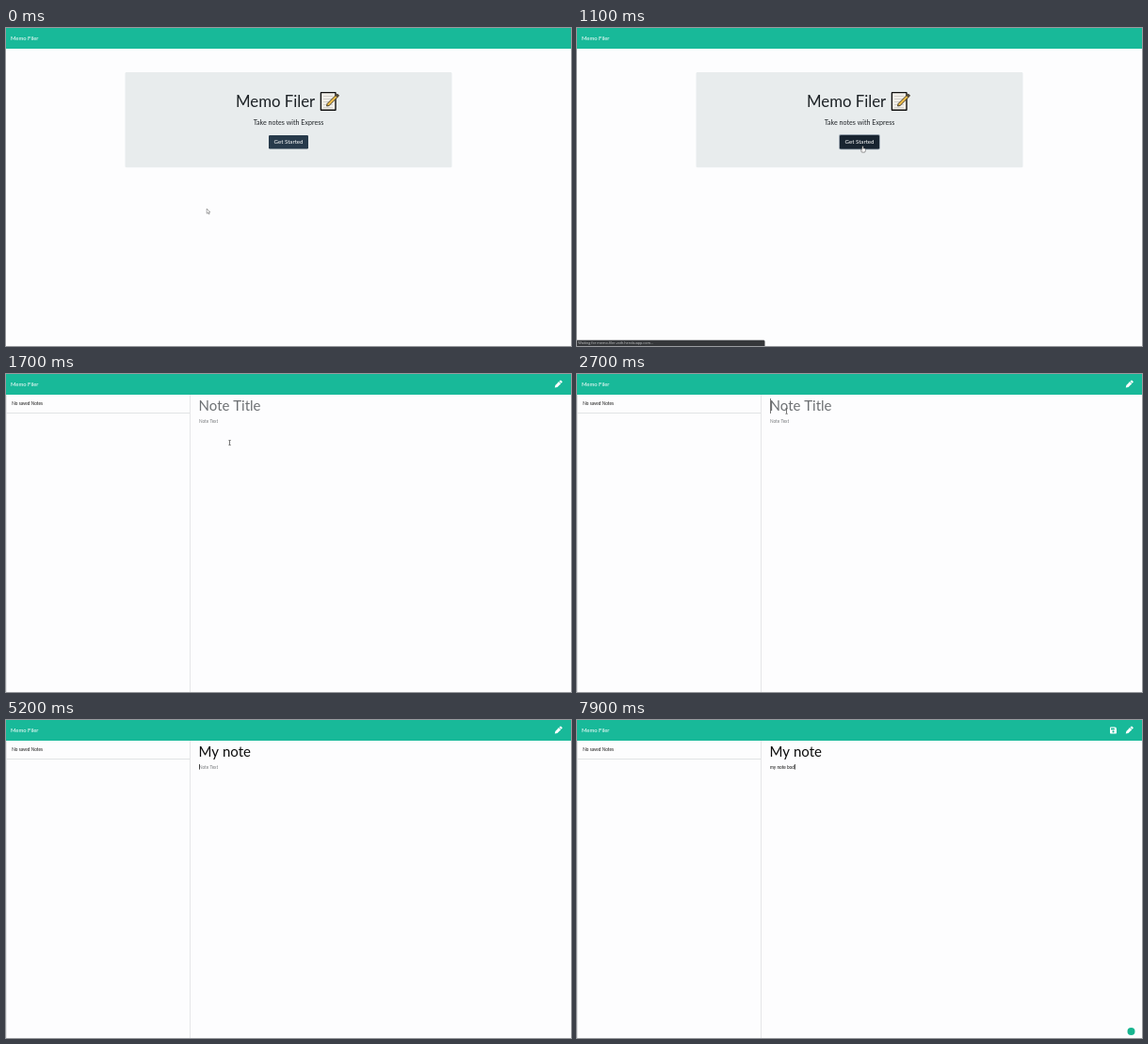
An HTML page with a canvas for the animation above (8000 ms loop, 600 by 338 pixels).

```html
<!DOCTYPE html>
<html lang="en">
<head>
<meta charset="utf-8">
<title>Memo Filer</title>
<style>
  html, body { margin: 0; width: 100%; height: 100%; overflow: hidden; background: #fdfdfe; }
  canvas { display: block; width: 600px; height: 338px; }
</style>
</head>
<body>
<canvas id="stage"></canvas>
<script>
const W = 600, H = 338, LOOP = 8000, STEP = 100;
const APP = "Memo Filer", HOST = "memo-filer-zxth.herokuapp.com";
const GREEN = "#18b999", PAGE = "#fdfdfe", INK = "#0c0c0c";
const OPEN_NOTES = 1200, LIST_LOADED = 1500;
const FOCUS_TITLE = 2400, TYPE_TITLE = 3900, FOCUS_BODY = 5200, TYPE_BODY = 5700;

const canvas = document.getElementById("stage");
const ctx = canvas.getContext("2d");
const dpr = window.devicePixelRatio || 1;
canvas.width = W * dpr;
canvas.height = H * dpr;

// Turning points of the pointer; it eases between them
const stops = [
  { t: 0, x: 213.2, y: 192 },
  { t: 500, x: 340, y: 79 },
  { t: 1000, x: 303.5, y: 125 },
  { t: 1200, x: 303, y: 126 },
  { t: 1700, x: 237.5, y: 73 },
  { t: 1900, x: 196, y: 89 },
  { t: 2200, x: 250, y: 42 },
  { t: 2400, x: 222.5, y: 39.5 }
];

function pointerAt(t) {
  const i = stops.findIndex(s => s.t > t);
  const b = stops.at(i), a = i < 0 ? b : stops[i - 1];
  const k = a === b ? 1 : (t - a.t) / (b.t - a.t);
  const ease = k * k * (3 - 2 * k);
  return [a.x + (b.x - a.x) * ease, a.y + (b.y - a.y) * ease];
}

// One character at `start`, then one more every `pace` ms
function typed(text, t, start, pace) {
  return text.slice(0, Math.max(0, Math.floor((t - start) / pace) + 1));
}

function rect(x, y, w, h, color) {
  ctx.fillStyle = color;
  ctx.fillRect(x, y, w, h);
}

function rounded(x, y, w, h, r, fill, stroke) {
  ctx.beginPath();
  ctx.roundRect(x, y, w, h, r);
  paint(fill, stroke);
}

function disc(x, y, r, color) {
  ctx.beginPath();
  ctx.arc(x, y, r, 0, Math.PI * 2);
  paint(color);
}

function polygon(points, fill, stroke) {
  ctx.beginPath();
  points.forEach(([x, y]) => ctx.lineTo(x, y));
  ctx.closePath();
  paint(fill, stroke);
}

function paint(fill, stroke) {
  ctx.fillStyle = fill;
  ctx.fill();
  if (stroke) {
    ctx.strokeStyle = stroke;
    ctx.stroke();
  }
}

function label(s, x, y, size, color, align = "left", family = "Lato") {
  ctx.font = `${size}px ${family}, sans-serif`;
  ctx.textAlign = align;
  ctx.fillStyle = color;
  ctx.fillText(s, x, y);
  return ctx.measureText(s).width;
}

function at(x, y, draw, angle = 0) {
  ctx.save();
  ctx.translate(x, y);
  ctx.rotate(angle);
  draw();
  ctx.restore();
}

// Pencil with its tip at the origin, pointing left
function pencil(length, half, body, end, stroke) {
  const neck = half * 1.5;
  polygon([[0, 0], [neck, -half], [length, -half], [length, half], [neck, half]], body, stroke);
  rounded(length * 0.84, -half, length * 0.16, half * 2, 0.4, end);
}

function memoIcon() {
  ctx.lineWidth = 1.4;
  rounded(334.4, 68.6, 15.6, 18.7, 0.3, "#f3f0ea", "#111");
  for (let y = 72; y < 85; y += 3) rect(337, y, 10, 0.7, "#c4c3bf");
  ctx.lineWidth = 0.8;
  at(340.6, 83, () => pencil(17, 1.4, "#f2bf4b", "#4d4740", "#2a241b"), -Math.PI / 4);
}

function editIcon() {
  at(582.8, 14.6, () => {
    pencil(7.4, 1.5, "#fff", "#fff");
    rounded(8, -1.5, 2.2, 3, 0.6, "#fff");
  }, -Math.PI / 4);
}

function saveIcon() {
  rounded(566, 7.6, 7, 7, [0.8, 2, 0.8, 0.8], "#fff");
  rect(567, 8.6, 3.8, 1.8, GREEN);
  disc(569.5, 12.4, 1.05, GREEN);
}

function arrow() {
  ctx.lineWidth = 0.5;
  polygon([[0, 0], [0, 5.2], [1.2, 4.2], [2.2, 6], [2.9, 5.6], [2.1, 3.9], [3.6, 3.8]], "#fff", "#555");
}

function hand() {
  ctx.lineWidth = 0.5;
  rounded(-1.4, 2.6, 4.4, 4, 1.2, "#fff", "#333");
  rounded(-0.4, 0, 1.3, 4.5, 0.6, "#fff", "#333");
  rect(-0.2, 3, 2.6, 2, "#fff");
}

function beam() {
  rect(-0.3, -2.8, 0.8, 5.6, "#555");
  for (const y of [-3, 2.4]) rect(-1.3, y, 2.8, 0.6, "#666");
}

function statusBar(s) {
  ctx.lineWidth = 0.6;
  rounded(-1, 332, 200.2, 8, 1, "#35373a", "#4a4c4f");
  label(s, 1.3, 336.3, 3.75, "#c6c8ca", "left", "'Open Sans'");
}

function home(t) {
  const hover = t >= 800, pressed = t >= 1000;
  rounded(126.5, 47, 347, 101.3, 1.4, "#e8eced");
  label(APP, 244, 84, 16.8, "#1d2226");
  memoIcon();
  label("Take notes with Express", 300, 102.5, 7.12, "#212529", "center");
  if (pressed) rounded(278.2, 113, 43.6, 16.3, 1.8, "#8a97a3");
  rounded(279, 113.9, 42, 14.5, 1.2, pressed ? "#182430" : hover ? "#1e2b37" : "#273a4b");
  label("Get Started", 300, 123.3, 6.15, "#fff", "center");
  if (pressed) statusBar(`Waiting for ${HOST}...`);
  else if (hover) statusBar(`${HOST}/notes`);
}

function noteTitle(t) {
  const text = typed("My", t, TYPE_TITLE, 200) + typed(" note", t, 4400, 75);
  const width = label(text || "Note Title", 204.6, 39.3, 15, text ? INK : "#6d7073");
  const blinkOff = t >= 3000 && t < 3500;
  if (t >= FOCUS_TITLE && t < FOCUS_BODY && !blinkOff) {
    rect(text ? Math.round(204.6 + width) : 205, 26, 1, 16, "#777");
  }
}

function noteBody(t) {
  const text = typed("my note bod", t, TYPE_BODY, 220);
  const width = label(text || "Note Text", 205, 51.5, 4.69, text ? INK : "#787b7e");
  if (t >= FOCUS_BODY) rect(text ? 205 + width : 205, 47, 0.8, 5.6, "#222");
}

function notes(t) {
  editIcon();
  for (const x of [0, 195]) rect(x, 22, 1, H - 22, "#e5e6e8");
  if (t >= LIST_LOADED) {
    label("No saved Notes", 6.3, 33.3, 4.69, "#151515");
    rect(0, 41, 195, 1, "#e1e3e4");
  } else {
    statusBar(`Waiting for ${HOST}...`);
  }
  noteTitle(t);
  noteBody(t);
  if (t >= TYPE_BODY) {
    saveIcon();
    disc(588.5, 331, 4, "#17b58f");
  }
}

function draw(t) {
  ctx.setTransform(dpr, 0, 0, dpr, 0, 0);
  rect(0, 0, W, H, PAGE);
  rect(0, 0, W, 22, GREEN);
  label(APP, 5, 13, 5.86, "#fff");
  if (t < OPEN_NOTES) home(t);
  else notes(t);
  // The pointer hides while typing
  if (t < TYPE_TITLE + 200) {
    at(...pointerAt(t), t < 800 ? arrow : t < OPEN_NOTES ? hand : beam);
  }
}

function tick() {
  const t = performance.now() % LOOP;
  draw(Math.floor(t / STEP) * STEP);
  requestAnimationFrame(tick);
}
tick();
</script>
</body>
</html>
```
